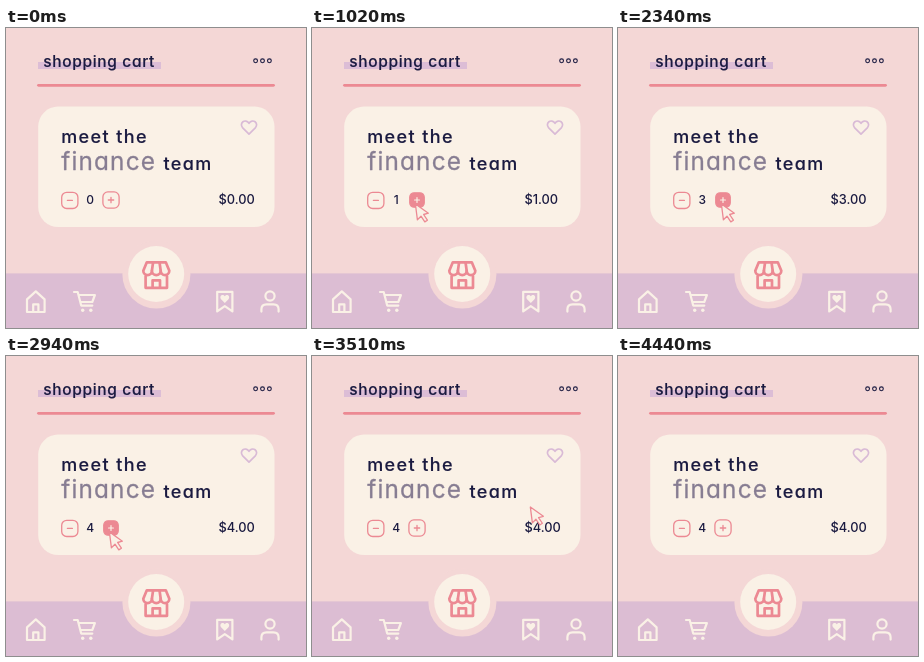
Write an HTML page that moves like this. It is 300x300 px and loops after 4500 ms.

```html
<!DOCTYPE html>
<html lang="en">
<head>
<meta charset="utf-8">
<title>Shopping cart</title>
<style>
  html, body { margin: 0; width: 100%; height: 100%; overflow: hidden; background: #f4d7d6; }
  svg { display: block; width: 100vw; height: 100vh; }
  text { font-family: Inter, "Open Sans", sans-serif; font-feature-settings: "cv11"; fill: #1a1a40; }
  .round { stroke: #1a1a40; stroke-width: .15; stroke-linejoin: round; font-weight: 500; }
  .title { font-size: 15.5px; letter-spacing: .65px; }
  .body { font-size: 18px; letter-spacing: 1.4px; }
  .accent { font-size: 24.3px; letter-spacing: 1.2px; font-weight: 400; fill: #877d92; stroke: #877d92; stroke-width: .3; }
  .line { fill: none; stroke-linecap: round; stroke-linejoin: round; }
  .pink { stroke: #ec8993; }
  .cream { stroke: #faf1e6; stroke-width: 2.2; }
</style>
</head>
<body>
<svg viewBox="0 0 300 300">
  <rect width="300" height="300" fill="#f4d7d6"/>

  <rect x="32" y="34" width="123" height="7" fill="#dcbdd6"/>
  <text class="round title" x="37.3" y="38.6">shopping cart</text>
  <g class="line" stroke="#1a1a40" stroke-width="1.1">
    <circle cx="249.6" cy="32.8" r="1.9"/>
    <circle cx="256.5" cy="32.8" r="1.9"/>
    <circle cx="263.4" cy="32.8" r="1.9"/>
  </g>
  <path class="line pink" d="M32.5 57.3H267.5" stroke-width="2.8"/>

  <rect x="32.2" y="78.6" width="236.3" height="120.4" rx="20" fill="#faf1e6"/>
  <path class="line" stroke="#d9bad6" stroke-width="1.7"
    d="M243 106.2L236.7 99.9C232.6 95.1 239.3 89.9 243 95.3C246.7 89.9 253.4 95.1 249.3 99.9Z"/>
  <text class="round body" x="55.2" y="114.7">meet the</text>
  <text class="round accent" x="55.2" y="142.4">finance</text>
  <text class="round body" x="157.5" y="141.6">team</text>

  <g class="line pink" stroke-width="1.3">
    <rect x="55.7" y="164.3" width="16.2" height="16.2" rx="5"/>
    <path d="M61.4 172.4H66.4"/>
    <g id="key">
      <rect id="cap" x="96.9" y="163.9" width="16.2" height="16.2" rx="5"/>
      <path id="plus" d="M102.3 172H107.7M105 169.3V174.7"/>
    </g>
  </g>
  <text id="count" x="84.2" y="176.2" font-size="12" font-weight="500" text-anchor="middle">0</text>
  <text id="price" x="212.5" y="175.5" font-size="12.8" font-weight="500">$0.00</text>

  <rect y="245.4" width="300" height="54.6" fill="#dcbdd3"/>
  <circle cx="150.4" cy="246.5" r="34" fill="#f4d7d6"/>
  <circle cx="150.2" cy="246" r="28" fill="#faf1e6"/>
  <g class="line pink" stroke-width="2.7" transform="translate(.3 -.7)">
    <path d="M140.5 235H159.5L163 243.5A4.3 4.3 0 0 1 154.4 243.5A4.4 4.4 0 0 1 145.6 243.5A4.3 4.3 0 0 1 137 243.5Z"/>
    <path d="M145.6 243.5L146.8 235M154.4 243.5L153.2 235"/>
    <path d="M139.3 249V260.5H160.7V249M146.3 260.5V253H153.7V260.5"/>
  </g>

  <g class="line cream">
    <path d="M21 271.4L29.8 263.4L38.6 271.4V284H21ZM27.2 284V276.3H32.4V284"/>
    <path d="M68 264H71.7L75.2 277.6H86.3M72.5 267H88.9L86.3 274H74.3"/>
    <path d="M211.2 263.8H226.4V283.4L218.8 278.2L211.2 283.4Z"/>
    <circle cx="264" cy="268" r="4.6"/>
    <path d="M255.4 283.6V281.3Q255.4 276.3 260.5 276.3H267.5Q272.6 276.3 272.6 281.3V283.6"/>
  </g>
  <g fill="#faf1e6">
    <circle cx="76.7" cy="282.2" r="1.7"/>
    <circle cx="84.8" cy="282.2" r="1.7"/>
    <path d="M218.8 275L215.1 271.2C212.8 268 216.8 265.3 218.8 268.3C220.8 265.3 224.8 268 222.5 271.2Z"/>
  </g>

  <path id="cursor" d="M0 0L2 15.8L5.6 12.2L9.4 17.9L12 16.2L8.2 10.5L13 9.2Z"
    fill="#faf1e6" stroke="#ec8993" stroke-width="1.3" stroke-linejoin="round"/>
</svg>
<script>
  const LOOP = 4500;
  const HOLD = 270;
  const CLICKS = [840, 1500, 2160, 2790];
  const REST = { x: 103.4, y: 176 };
  const ENTRY = { x: 146.6, y: 274, at: 100, time: 600 };
  const EXIT = { at: 3060, ramp: 120, speed: 0.294 };

  const $ = id => document.getElementById(id);
  const [cursor, key, cap, plus, count, price] =
    ['cursor', 'key', 'cap', 'plus', 'count', 'price'].map($);
  const clamp = v => Math.min(1, Math.max(0, v));
  const smooth = u => u * u * (3 - 2 * u);

  function cursorAt(t) {
    if (t < EXIT.at) {
      const left = 1 - smooth(clamp((t - ENTRY.at) / ENTRY.time));
      return [REST.x + (ENTRY.x - REST.x) * left, REST.y + (ENTRY.y - REST.y) * left];
    }
    // Accelerate briefly, then glide out along a shallow arc.
    const dt = t - EXIT.at;
    const d = EXIT.speed * (dt < EXIT.ramp ? dt * dt / (2 * EXIT.ramp) : dt - EXIT.ramp / 2);
    return [REST.x + d, REST.y - 0.24 * d + 0.0002 * d * d];
  }

  function draw(t) {
    const n = CLICKS.filter(c => t >= c).length;
    const pressed = n > 0 && t < CLICKS[n - 1] + HOLD;
    count.textContent = n;
    price.textContent = `$${n}.00`;
    cap.style.fill = pressed ? '#ec8993' : 'none';
    plus.style.stroke = pressed ? '#faf1e6' : '#ec8993';
    key.setAttribute('transform', pressed ? 'translate(105 172) scale(.9) translate(-105 -172)' : '');
    cursor.setAttribute('transform', `translate(${cursorAt(t)})`);
    cursor.setAttribute('opacity', clamp((t - 60) / 140));
  }

  const start = performance.now();
  function tick() {
    draw((performance.now() - start) % LOOP);
    requestAnimationFrame(tick);
  }
  tick();
</script>
</body>
</html>
```
